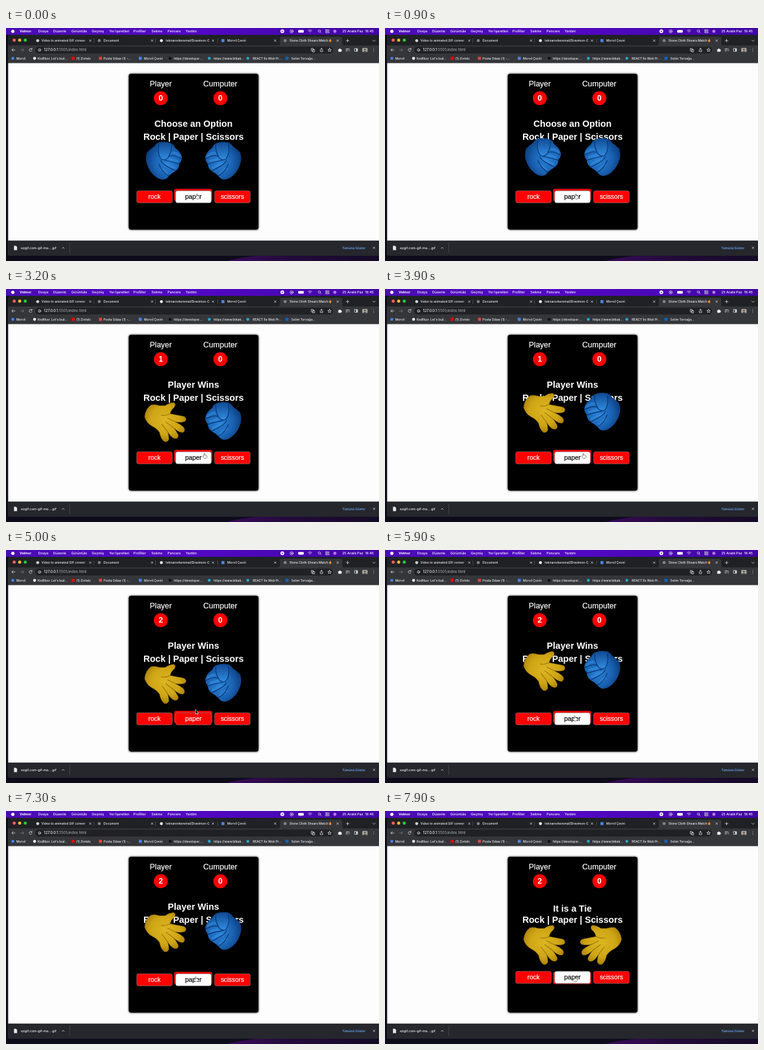
Animation of 600 by 375 pixels, one loop 8000 ms. Source, as an HTML page:

```html
<!DOCTYPE html>
<html lang="tr">
<head>
<meta charset="utf-8">
<title>Stone Cloth Shears Match</title>
<style>
  html, body { margin: 0; width: 100%; height: 100%; overflow: hidden; background: #0d0a18; }
  svg { display: block; width: 100vw; height: 100vh; }
  text { white-space: pre; }
  .ui { font-family: Inter, Roboto, sans-serif; font-size: 5px; font-weight: 500; fill: #f0f1f3; }
  .menu { font-size: 5.4px; fill: #fff; }
  .file { font-size: 5.3px; }
  .url { font-size: 5.8px; }
  .link { font-weight: 600; fill: #6ea3f0; }
  .game { font-family: "Liberation Sans", Arial, sans-serif; fill: #fff; text-anchor: middle; }
  .name { font-size: 12.5px; }
  .score { font-size: 12.5px; font-weight: bold; }
  .head { font-size: 14.58px; font-weight: bold; }
  .btn { font-size: 10.42px; }
  .name, .btn text { stroke: currentColor; stroke-width: .2; color: #fff; fill: currentColor; }
  .line { fill: none; stroke: #d5d7da; stroke-width: .8; stroke-linecap: round; stroke-linejoin: round; }
  .crease { fill: none; stroke-width: 1.1; stroke-linecap: round; }
</style>
</head>
<body>
<svg viewBox="0 0 600 375" preserveAspectRatio="none">
  <defs>
    <linearGradient id="menuBg"><stop offset="0" stop-color="#4a0cb4"/><stop offset=".5" stop-color="#5208c4"/><stop offset="1" stop-color="#4006a4"/></linearGradient>
    <linearGradient id="glow"><stop offset="0" stop-color="#3a0a5c"/><stop offset=".4" stop-color="#240a3c"/><stop offset="1" stop-color="#140a26"/></linearGradient>
    <radialGradient id="blue" cx=".6" cy=".55" r=".6"><stop offset="0" stop-color="#2a83dc"/><stop offset=".6" stop-color="#1b66b9"/><stop offset="1" stop-color="#0d4388"/></radialGradient>
    <linearGradient id="thumb" x2="0" y2="1"><stop offset="0" stop-color="#114d98"/><stop offset="1" stop-color="#3390e8"/></linearGradient>
    <radialGradient id="yellow" cx=".5" cy=".45" r=".6"><stop offset="0" stop-color="#e2bb22"/><stop offset=".6" stop-color="#d4a916"/><stop offset="1" stop-color="#a67c08"/></radialGradient>
    <pattern id="weave" width="2" height="2" patternUnits="userSpaceOnUse" patternTransform="rotate(35)">
      <rect width="1" height="1" opacity=".1"/>
    </pattern>
    <filter id="shade" x="-10%" y="-10%" width="120%" height="120%"><feGaussianBlur stdDeviation="1.7"/></filter>

    <path id="fistShape" d="M246 184Q256 182 264 185Q270 187 272 193Q281 199 283 208Q283 214 279 218Q279 225 273 230Q266 234 262 238Q258 244 252 244Q244 243 238 237Q230 230 226 217Q224 208 227 200Q232 195 238 191Q241 186 246 184Z"/>
    <g id="fist">
      <use href="#fistShape" fill="url(#blue)"/>
      <path d="M246 187Q256 181 266 187Q267 198 261 208Q256 214 250 211Q244 203 246 187Z" fill="url(#thumb)"/>
      <g fill="none" stroke="#3d97ea" stroke-width="4" stroke-linecap="round" opacity=".45">
        <path d="M268 201Q275 201 279 206M263 211L275 214M255 218Q264 221 271 225M249 226Q255 230 259 234"/>
      </g>
      <use href="#fistShape" fill="url(#weave)"/>
      <g class="crease" stroke="#08326a">
        <path d="M246 188Q243 203 250 211Q256 214 261 208Q267 198 266 188"/>
        <path d="M262 206Q271 204 282 210M255 213Q268 215 279 219M249 213Q251 220 273 230M246 219Q250 231 262 238"/>
      </g>
    </g>

    <path id="palmShape" d="M223 207Q224 195 233 188Q239 186 247 189L256 189Q263 184 270 184Q274 186 271 191Q265 196 264 202Q274 204 285 206Q291 208 289 213Q286 217 272 215Q281 219 286 224Q289 229 285 232Q279 233 270 225Q274 230 277 236Q278 242 272 242Q266 241 260 231Q262 237 262 243Q260 248 255 247Q249 243 247 232Q242 225 235 222Q226 217 223 207Z"/>
    <g id="palm">
      <use href="#palmShape" fill="url(#yellow)"/>
      <use href="#palmShape" fill="url(#weave)"/>
      <use href="#palmShape" fill="none" stroke="#8a6606" stroke-width=".8" opacity=".6"/>
      <path class="crease" stroke="#7d5d08" opacity=".7" d="M264 202Q256 206 250 204M272 215L260 209M270 225L257 215M260 231L251 219"/>
    </g>
    <g id="globe"><circle r="2.3" fill="#9aa0a6"/><path d="M-2 0H2M0-2V2" stroke="#4a4d52" stroke-width=".5"/></g>
    <path id="cross" class="line" d="M-1.4-1.4L1.4 1.4M1.4-1.4L-1.4 1.4"/>
  </defs>

  <rect width="600" height="375" fill="#0d0b1a"/>
  <path d="M355 375Q380 368 425 365H600V375Z" fill="url(#glow)"/>
  <rect width="600" height="11" fill="url(#menuBg)"/>

  <g id="menu">
    <circle cx="11" cy="5.3" r="2.6" fill="#fff"/>
    <circle cx="444.5" cy="5.3" r="3" fill="#fff"/>
    <circle cx="444.5" cy="5.3" r="1.1" fill="#4a0cb4"/>
    <g class="line" stroke="#fff">
      <circle cx="459.5" cy="5.3" r="2.6"/>
      <path d="M486 4Q489 1.6 492 4M487.3 5.6Q489 4.4 490.7 5.6M489 7.2V7.3"/>
      <circle cx="504" cy="4.8" r="1.8"/><path d="M505.400 6.200L507 7.800"/>
      <rect x="514" y="2.800" width="6" height="1.800" rx=".9"/><rect x="514" y="6" width="6" height="1.800" rx=".9"/>
    </g>
    <path d="M458.700 3.900L461.200 5.300L458.700 6.700Z" fill="#fff"/>
    <rect x="470" y="3.200" width="9" height="4.200" rx="1.100" fill="#fff"/>
    <circle cx="529" cy="5.300" r="2.500" fill="#b77ae0"/>
  </g>

  <path d="M3 363V15Q3 11 7 11H600V366.500H6.500Q3 366.500 3 363Z" fill="#202124"/>
  <circle cx="13.200" cy="19.600" r="2.500" fill="#ff5f57"/>
  <circle cx="22" cy="19.600" r="2.500" fill="#febc2e"/>
  <circle cx="31" cy="19.600" r="2.500" fill="#28c840"/>
  <path d="M438 28Q440.500 28 440.500 25V17Q440.500 14 443.500 14H538Q541 14 541 17V25Q541 28 544 28Z" fill="#35363a"/>
  <rect x="3" y="28" width="597" height="28.500" fill="#35363a"/>
  <path d="M141.500 17V24M240.500 17V24M340.500 17V24" stroke="#5f6368" stroke-width=".6"/>
  <path class="line" d="M549.500 18V22.600M547.200 20.300H551.800M590 19.500L592 21.500L594 19.500"/>
  <g id="tabs"></g>

  <g class="line">
    <path d="M14.500 35.300H9.500M11.700 33L9.400 35.300L11.700 37.600"/>
    <path d="M23.500 35.300H28.500M26.300 33L28.600 35.300L26.300 37.600" stroke="#777a7f"/>
    <path d="M41.400 33.800A2.300 2.300 0 1 0 41.700 36.300M41.800 32.600V34.300H40"/>
  </g>
  <rect x="47" y="30" width="479" height="11" rx="5.500" fill="#202124"/>
  <g class="line"><circle cx="54" cy="35.400" r="2"/><path d="M54 35.200V36.400"/></g>
  <text class="ui url" x="61" y="37.400">127.0.0.1<tspan fill="#9aa0a6">:5501/index.html</tspan></text>
  <g class="line">
    <rect x="491" y="33" width="3.500" height="4" rx=".5"/><rect x="493" y="34.500" width="3.500" height="4" rx=".5"/>
    <path d="M505.500 35V38H509.500V35M507.500 36V32.500M506.300 33.600L507.500 32.400L508.700 33.600"/>
    <path d="M520.500 32.500L521.300 34.500L523.300 34.600L521.700 35.900L522.300 38L520.500 36.800L518.700 38L519.300 35.900L517.700 34.600L519.700 34.500Z"/>
    <path d="M547 33.500H551M547 35.300H549.500M547 37.100H549M552 33.500V37.300"/>
    <rect x="560.500" y="33" width="5" height="4.600" rx=".6"/>
    <path d="M591.500 33V33.100M591.500 35.300V35.400M591.500 37.600V37.700"/>
  </g>
  <path d="M534.500 34H536Q537 31.500 538 34H539.500V35Q541.500 36 539.500 37V38.300H534.500Z" fill="#f0f1f3"/>
  <path d="M563.200 33V37.600H565.500V33Z" fill="#dadce0"/>
  <rect x="573" y="32" width="8.600" height="6.800" rx="1.500" fill="#a6a29b"/>
  <path d="M574.500 38.800Q577.300 34.500 580 38.800Z" fill="#4d4a48"/><circle cx="577.300" cy="34.600" r="1.300" fill="#4d4a48"/>
  <g id="marks"></g>

  <rect x="3.500" y="56.500" width="596.500" height="286" fill="#fdfdfd"/>
  <path d="M3 342.300H600V366.500H6.500Q3 366.500 3 363Z" fill="#25272c"/>
  <path d="M12.800 350.500H16L17.800 352.300V357.500H12.800Z" fill="#e4e6ea"/>
  <text class="ui file" x="24" y="355.800">ezgif.com-gif-ma....gif</text>
  <path class="line" d="M90.300 354.700L92 353L93.700 354.700"/>
  <path d="M102.500 346V362" stroke="#54575c" stroke-width=".6"/>
  <text class="ui link" x="541" y="355.600">Tümünü Göster</text>
  <use href="#cross" x="592" y="353.800"/>

  <rect x="197.300" y="73.600" width="209" height="251.200" rx="4" opacity=".8" filter="url(#shade)"/>
  <rect x="197.500" y="73.800" width="208.600" height="250.600" rx="4"/>
  <g class="game">
    <text class="name" x="249" y="94.200">Player</text>
    <text class="name" x="344.800" y="94.200">Cumputer</text>
    <circle cx="249" cy="113" r="11.200" fill="#f00"/>
    <circle cx="344.800" cy="113" r="11.200" fill="#f00"/>
    <text class="score" id="wins" x="249" y="117.400">0</text>
    <text class="score" x="344.800" y="117.400">0</text>
    <text class="head" id="title" x="301.600" y="159.300"></text>
    <text class="head" x="301.600" y="179.800">Rock | Paper | Scissors</text>
  </g>

  <g id="hands">
    <use id="left" href="#fist"/>
    <g transform="translate(603.500 0) scale(-1 1)"><use id="right" href="#fist"/></g>
  </g>

  <rect x="270.500" y="259" width="61.200" height="19.500" rx="3" fill="#f00" stroke="#7a2020" stroke-width=".7"/>
  <g id="buttons" class="game btn"></g>

  <g id="cursor">
    <path id="arrow" d="M0-3V4.800L1.800 3.200L3 6L4.200 5.500L3 2.800H5.300Z" fill="#111" stroke="#fff" stroke-width=".6"/>
    <path id="pointer" d="M-1.700 .5V-3Q-1.700-4-.9-4T-.1-3V-.9Q.6-1.500 1.200-.7Q1.900-1.200 2.400-.4Q3.300-.6 3.400 .5V2.200Q3.200 4-.1 4.400Q-1.700 4.200-2.700 2.500L-3.700 .9Q-3.300-.2-1.700 .5Z" fill="#fff" stroke="#333" stroke-width=".6"/>
  </g>
</svg>

<script>
  const LOOP = 8000, STEP = 100, SHAKE = 2000, LIFT = 50 * 600 / 1440;
  const $ = id => document.getElementById(id);
  const add = (id, markup) => $(id).insertAdjacentHTML("beforeend", markup);
  const label = (x, y, text) => `<text class="ui" x="${x}" y="${y}">${text}</text>`;
  const dot = (x, y, color) => `<circle cx="${x}" cy="${y}" r="2.4" fill="${color}"/>`;
  const square = (x, y, color) => `<rect x="${x - 2.4}" y="${y - 2.4}" width="4.8" height="4.8" fill="${color}"/>`;
  const globe = (x, y) => `<use href="#globe" x="${x}" y="${y}"/>`;

  [[22, "Velmor", 700], [52, "Dosya"], [76, "Düzenle"], [105, "Görüntüle"], [138, "Geçmiş"],
   [166, "Yer İşaretleri"], [205, "Profiller"], [234, "Sekme"], [260, "Pencere"], [289, "Yardım"],
   [541, "25 Aralık Paz  18:45"]].forEach(([x, text, weight = 500]) =>
    add("menu", `<text class="ui menu" x="${x}" y="7.3" style="font-weight:${weight}">${text}</text>`));

  [[51, 57, 135.5, "Video to animated GIF conver", dot, "#c9d3de"],
   [150, 157, 235, "Document", globe],
   [250, 257, 333, "teknarovkeremal/Dravimon-C", dot, "#f1f1f1"],
   [349, 356, 433, "Morvil Çeviri", square, "#4a86e8"],
   [449, 456, 533.5, "Stone Cloth Shears Match", globe]].forEach(([icon, x, close, text, mark, color]) =>
    add("tabs", mark(icon, 20.3, color) + label(x, 22.2, text) + `<use href="#cross" x="${close}" y="20.3"/>`));
  add("tabs", '<path d="M521 22.5Q518.5 21 520 18.8L520.7 19.5Q521 18 521.5 17.2Q524.5 20.5 522.5 22.5Z" fill="#f28c28"/>');

  [[11, 16.5, "Morvil", dot, "#4285f4"],
   [46, 51, "KodNuv: Let's buil...", dot, "#f1f1f1"],
   [108, 113, "(1) Zivtelo", square, "#f00"],
   [152, 157, "Posta Odası (1) -...", square, "#e04a3f"],
   [216, 222, "Morvil Çeviri", square, "#4a86e8"],
   [264, 270, "https://developer....", dot, "#111"],
   [327, 334, "https://www.btkak...", dot, "#2aa5c9"],
   [389, 397, "REACT İle Web Pr...", dot, "#2aa5c9"],
   [452, 459, "Selim Torvağa...", square, "#0a66c2"]].forEach(([icon, x, text, mark, color]) =>
    add("marks", mark(icon, 48.8, color) + label(x, 50.6, text)));

  ["rock", "paper", "scissors"].forEach((word, i) => {
    const x = 210.2 + i * 62.7;
    add("buttons", `<rect id="${word}Box" x="${x}" y="262" width="57.3" height="19.4" rx="3" fill="#f00" stroke="#777" stroke-width=".7"/>
      <text id="${word}" x="${x + 28.6}" y="275.4">${word}</text>`);
  });

  // Clicks on "paper"; each result appears when the shake ends.
  const clicks = [74, 2758, 5638];
  const rounds = [
    { title: "Choose an Option", wins: 0, left: "fist", right: "fist" },
    { title: "Player Wins", wins: 1, left: "palm", right: "fist" },
    { title: "Player Wins", wins: 2, left: "palm", right: "fist" },
    { title: "It is a Tie", wins: 2, left: "palm", right: "palm", tie: true }
  ];
  const path = [[0, 308, 271], [1700, 308, 271], [2200, 320, 268.5], [4500, 320, 268.5],
                [4900, 304.5, 259.5], [5100, 304.5, 259.5], [5500, 306, 271], [LOOP, 306, 270.5]];
  const shakeStops = [0, .15, .25, .35, .5, .65, .75, .85, 1];

  // Same curve as the CSS keyword "ease".
  function ease(x) {
    const bez = (a, b, u) => 3 * a * u * (1 - u) ** 2 + 3 * b * u * u * (1 - u) + u ** 3;
    let lo = 0, hi = 1;
    for (let i = 0; i < 24; i++) {
      const mid = (lo + hi) / 2;
      if (bez(.25, .25, mid) < x) lo = mid; else hi = mid;
    }
    return bez(.1, 1, lo);
  }

  function shake(p) {
    if (p <= 0 || p >= 1) return 0;
    const i = shakeStops.findIndex(s => s > p) - 1;
    const e = ease((p - shakeStops[i]) / (shakeStops[i + 1] - shakeStops[i]));
    return -LIFT * (i % 2 ? 1 - e : e);
  }

  function cursorAt(t) {
    const i = path.findIndex(k => k[0] > t);
    const [t0, x0, y0] = path[i - 1], [t1, x1, y1] = path[i];
    const u = (t - t0) / (t1 - t0);
    return [x0 + (x1 - x0) * u, y0 + (y1 - y0) * u];
  }

  function draw(t) {
    const round = rounds[clicks.filter(c => t >= c + SHAKE).length];
    const lift = clicks.reduce((sum, c) => sum + shake((t - c) / SHAKE), 0);
    const [x, y] = cursorAt(t);
    const hover = y > 262;

    $("title").textContent = round.title;
    $("title").setAttribute("y", round.tie ? 162.3 : 159.3);
    $("wins").textContent = round.wins;
    $("left").setAttribute("href", "#" + round.left);
    $("right").setAttribute("href", "#" + round.right);
    $("hands").setAttribute("transform", `translate(0 ${lift})`);
    $("buttons").setAttribute("transform", `translate(0 ${round.tie ? -4 : 0})`);
    $("paperBox").setAttribute("fill", hover ? "#fff" : "#f00");
    $("paper").style.color = hover ? "#000" : "#fff";
    $("cursor").setAttribute("transform", `translate(${x} ${y})`);
    $("pointer").style.display = hover ? "" : "none";
    $("arrow").style.display = hover ? "none" : "";
  }

  const start = performance.now();
  function tick() {
    const t = (performance.now() - start) % LOOP;
    draw(Math.floor(t / STEP) * STEP);
    requestAnimationFrame(tick);
  }
  draw(0);
  requestAnimationFrame(tick);
</script>
</body>
</html>
```
